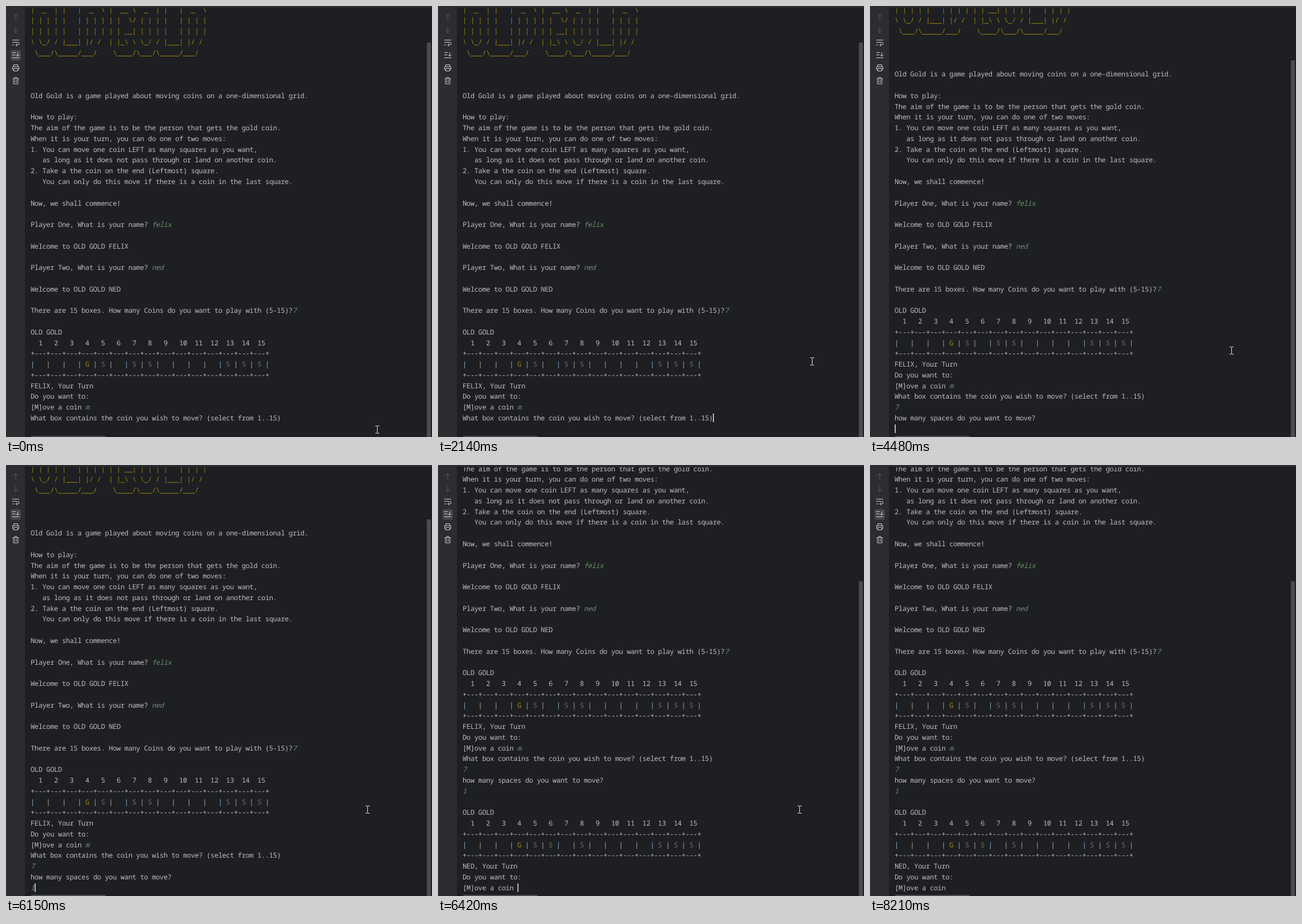
An HTML page with a canvas that plays this animation: 744 px wide and 753 px high, repeating every 8.55 s.

```html
<!DOCTYPE html>
<html lang="en">
<head>
<meta charset="utf-8">
<title>Old Gold</title>
<style>
html, body { margin: 0; width: 100%; height: 100%; overflow: hidden; background: #1e1f22; }
canvas { display: block; }
</style>
</head>
<body>
<canvas id="stage" width="744" height="753"></canvas>
<script>
const ctx = document.getElementById('stage').getContext('2d');
const W = 744, H = 753, LOOP = 8550;
const CELL = 6.827, ROW = 18.773, LEFT = 43.2, FIRST_BASE = 10.6;
const PAGE = 40;            // rows that fit in the console
const ABOVE = 3.5;          // rows already scrolled away at the start
const BLINK = 520, HOLD = 200, TICK = 66;
const FONT = '500 12px "Noto Sans Mono", "DejaVu Sans Mono", monospace';
const COLOR = {
  back: '#1e1f22', panel: '#2b2d30', text: '#bcbec4', input: '#66926f',
  gold: '#a68a0d', olive: '#91890d', silver: '#707070',
  blue: '#8ab4da', tan: '#c2b29c', thumb: '#4a4b4d',
  icon: '#ced0d6', dim: '#5a5d63', pressed: '#43454a', pointer: '#e8e8e8'
};

// One board: title, numbers and the row of coins
function board(gold, silvers) {
  const edge = '+---'.repeat(15) + '+';
  let numbers = '  ', cells = '|';
  for (let i = 1; i <= 15; i++) {
    numbers += String(i).padEnd(4);
    cells += ` ${i === gold ? 'G' : silvers.includes(i) ? 'S' : ' '} |`;
  }
  return ['OLD GOLD', numbers, edge, { kind: 'cells', text: cells }, edge];
}

const banner = [
  '|  _  | |   |  _  \\ |  __ \\  _  | |   |  _  \\',
  '| | | | |   | | | | | |  \\/ | | | |   | | | |',
  '| | | | |   | | | | | | __| | | | |   | | | |',
  '\\ \\_/ / |___| |/ /  | |_\\ \\ \\_/ / |___| |/ /',
  ' \\___/\\_____/___/    \\____/\\___/\\_____/___/'
].map(text => ({ kind: 'banner', text }));

// Braces mark what the player typed
const lines = [
  ...banner, '', '', '',
  'Old Gold is a game played about moving coins on a one-dimensional grid.', '',
  'How to play:',
  'The aim of the game is to be the person that gets the gold coin.',
  'When it is your turn, you can do one of two moves:',
  '1. You can move one coin LEFT as many squares as you want,',
  '   as long as it does not pass through or land on another coin.',
  '2. Take a the coin on the end (Leftmost) square.',
  '   You can only do this move if there is a coin in the last square.', '',
  'Now, we shall commence!', '',
  'Player One, What is your name? {felix}', '',
  'Welcome to OLD GOLD FELIX', '',
  'Player Two, What is your name? {ned}', '',
  'Welcome to OLD GOLD NED', '',
  'There are 15 boxes. How many Coins do you want to play with (5-15)?{7}', '',
  ...board(4, [5, 7, 8, 13, 14, 15]),
  'FELIX, Your Turn',
  'Do you want to:',
  '[M]ove a coin {m}',
  'What box contains the coin you wish to move? (select from 1..15)',
  '{7}',
  'how many spaces do you want to move?',
  '{1}', '',
  ...board(4, [5, 6, 8, 13, 14, 15]),
  'NED, Your Turn',
  'Do you want to:',
  '[M]ove a coin '
].map(line => line.text ? line : { kind: 'plain', text: line });

const CLICK = 1070, REPLY = 4680;
const FIRST_ASK = lines.findIndex(l => l.text.startsWith('What box'));
const SECOND_ASK = FIRST_ASK + 3;
const END = lines.length - 1;

// Console events: last printed line, and the line scrolled into view
const events = [
  { at: 0, last: FIRST_ASK, noCaret: true },
  { at: CLICK, last: FIRST_ASK },
  { at: 3950, last: FIRST_ASK + 1, hold: HOLD },
  { at: 4480, last: SECOND_ASK, blank: true, hold: HOLD },
  { at: 6150, last: SECOND_ASK, hold: HOLD },
  { at: 6350, last: END, view: SECOND_ASK + 1 },
  { at: 6420, last: END, hold: HOLD }
];

const moves = [
  { at: 70, span: 530, path: [[648, 740], [422, 706], [490, 714]] },
  { at: CLICK, span: 600, path: [[490, 714], [590, 738], [700, 690], [671, 648]] },
  { at: 1870, span: 270, path: [[671, 648], [653, 621]] },
  { at: 2270, span: 340, path: [[653, 621], [631, 602]] },
  { at: 7750, span: 190, path: [[631, 602], [716, 618]] }
];
const POINTER_GONE = 8010;

const latest = (list, t) => list.filter(e => e.at <= t).pop();

function along(points, p) {
  const n = points.length - 1;
  const i = Math.min(n - 1, Math.floor(p * n)), f = p * n - i;
  const [a, b] = [points[i], points[i + 1]];
  return a.map((v, k) => v + (b[k] - v) * f);
}

function pointerAt(t) {
  const move = latest(moves, t);
  if (!move) return moves[0].path[0];
  const step = d => Math.floor(d / TICK) + 1;
  return along(move.path, Math.min(1, step(t - move.at) / step(move.span)));
}

function rect(x, y, w, h, color) {
  ctx.fillStyle = color;
  ctx.fillRect(x, y, w, h);
}

function glyphColor(kind, ch, col) {
  if (kind === 'banner') return col % 6 ? COLOR.gold : COLOR.olive;
  if (kind === 'cells') {
    if (ch === 'G') return COLOR.gold;
    if (ch === 'S') return COLOR.silver;
    return col % 12 ? COLOR.tan : COLOR.blue;
  }
  return COLOR.text;
}

function drawLine({ kind, text }, y) {
  let col = 0, typed = false;
  ctx.font = FONT;
  for (const ch of text) {
    if (ch === '{' || ch === '}') {
      typed = ch === '{';
      ctx.font = (typed ? 'italic ' : '') + FONT;
      continue;
    }
    ctx.fillStyle = typed ? COLOR.input : glyphColor(kind, ch, col);
    ctx.fillText(ch, LEFT + (col + 0.5) * CELL, y);
    col++;
  }
}

function drawConsole(t) {
  const event = latest(events, t);
  const { at, last, view = last, blank, noCaret, hold = 0 } = event;
  const hidden = n => Math.max(0, n - PAGE + 1);
  const scroll = hidden(view);
  const baseline = n => FIRST_BASE + (n - scroll) * ROW;

  ctx.save();
  ctx.beginPath();
  ctx.rect(33, 4, W - 33, H - 4);
  ctx.clip();
  const end = blank ? last - 1 : last;
  for (let n = scroll; n <= end; n++) drawLine(lines[n], baseline(n));

  const age = Math.max(0, t - at - hold);
  if (!noCaret && Math.floor(age / BLINK) % 2 === 0) {
    const col = blank ? 0 : lines[last].text.replace(/[{}]/g, '').length;
    rect(LEFT + col * CELL, Math.round(baseline(last) - 12), 1.7, 15, COLOR.icon);
  }
  ctx.restore();

  const unit = (H - 4) / (ABOVE + PAGE + hidden(last));
  rect(735, Math.round(4 + (ABOVE + scroll) * unit), 7, Math.round(PAGE * unit), COLOR.thumb);
  rect(44, 751, 130, 2, COLOR.thumb);
}

function icon(y, path, color = COLOR.icon) {
  ctx.save();
  ctx.translate(17, y);
  ctx.strokeStyle = color;
  ctx.lineWidth = 1;
  ctx.stroke(new Path2D(path));
  ctx.restore();
}

function drawToolbar(pressed) {
  rect(0, 0, W, 3, COLOR.panel);
  rect(0, 0, 33, H, COLOR.panel);
  if (pressed) {
    ctx.fillStyle = COLOR.pressed;
    ctx.beginPath();
    ctx.roundRect(8, 77, 18, 19, 3);
    ctx.fill();
  }
  icon(19.5, 'M0 5.5V-5 M-4 -1L0 -5L4 -1', COLOR.dim);
  icon(42, 'M0 -5.5V5 M-4 1L0 5L4 1', COLOR.dim);
  icon(64, 'M-6 -4.5H6 M-6 -.5H3.5Q6 -.5 6 1.7T3.5 4H0 M2.5 1.5L0 4L2.5 6.5 M-6 4H-3');
  icon(86, 'M-6 -4.5H0 M-6 -.5H-1 M-6 4.5H6 M3.5 -5V2 M.5 -1L3.5 2L6.5 -1');
  icon(108, 'M-3.5 -2V-5.5H3.5V-2 M-3.5 3H-5.5V-2H5.5V3H3.5 M-3.5 1H3.5V5.5H-3.5Z');
  icon(130.5, 'M-5.5 -3.5H5.5 M-2 -3.5V-5.5H2V-3.5 M-4 -3.5V5.5H4V-3.5 M-1.5 -1V3 M1.5 -1V3');
}

function drawPointer(point) {
  const [x, y] = point.map(Math.round);
  rect(x, y - 6, 1, 12, COLOR.pointer);
  for (const end of [y - 7, y + 6]) {
    rect(x - 3, end, 3, 1, COLOR.pointer);
    rect(x + 1, end, 3, 1, COLOR.pointer);
  }
}

function draw(t) {
  rect(0, 0, W, H, COLOR.back);
  drawConsole(t);
  drawToolbar(t < CLICK || t >= REPLY);
  if (t < POINTER_GONE) drawPointer(pointerAt(t));
}

ctx.textAlign = 'center';
if ('textRendering' in ctx) ctx.textRendering = 'geometricPrecision';

const begin = performance.now();
function tick() {
  draw((performance.now() - begin) % LOOP);
  requestAnimationFrame(tick);
}
tick();
</script>
</body>
</html>
```
